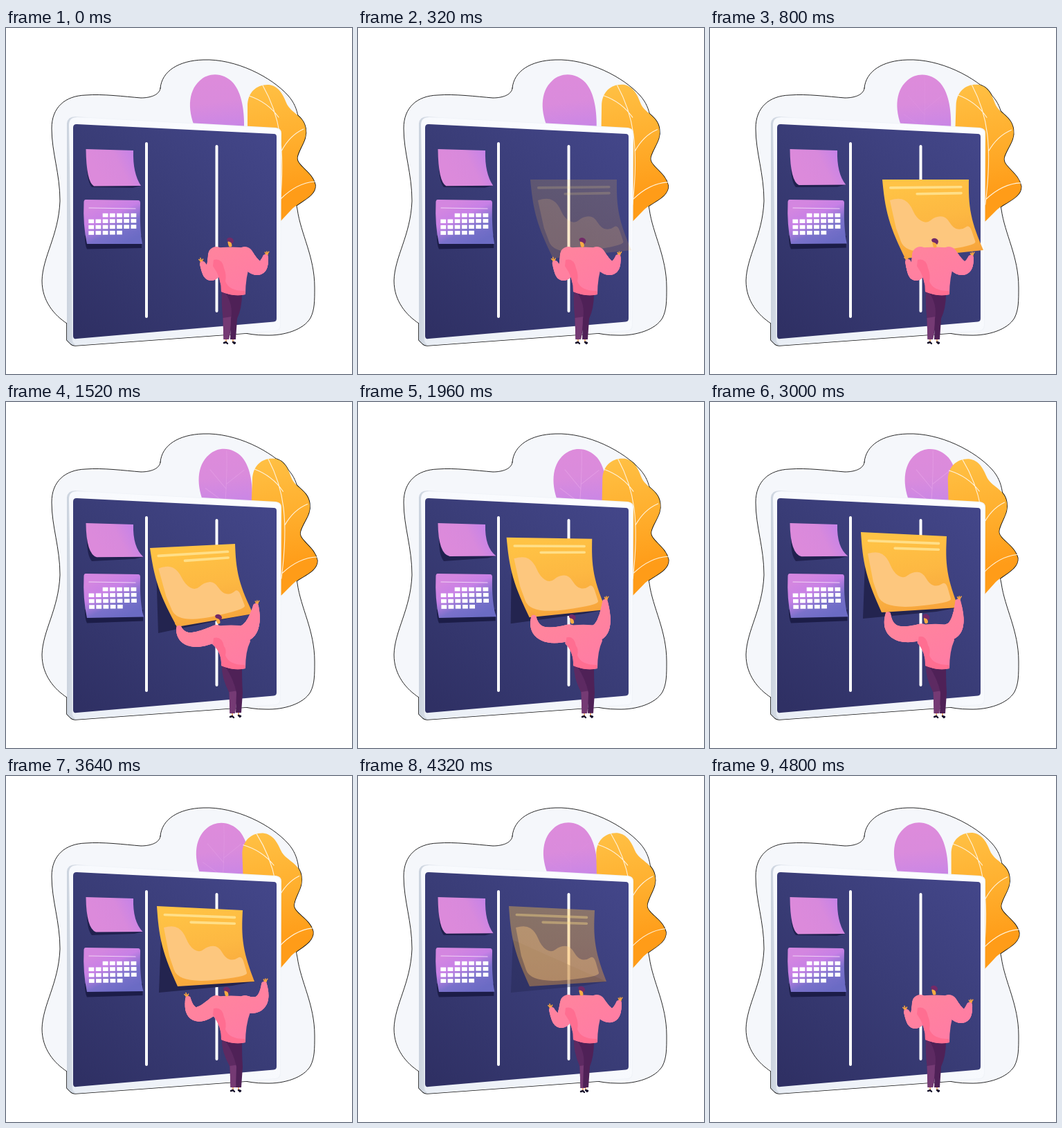
These frames come from a looping animation (500 px wide and 500 px high, 4.84 s). An HTML page with a canvas:

```html
<!DOCTYPE html>
<html lang="en">
<head>
<meta charset="utf-8">
<title>Planning board</title>
<style>
html, body { margin: 0; width: 100%; height: 100%; overflow: hidden; background: #fff; }
canvas { display: block; width: 500px; height: 500px; }
</style>
</head>
<body>
<canvas id="stage" width="500" height="500"></canvas>
<script>
const ctx = document.getElementById('stage').getContext('2d');
const LOOP = 4840;
const TAU = Math.PI * 2;

const clamp = x => Math.max(0, Math.min(1, x));
const mix = (a, b, k) => a + (b - a) * k;
const ramp = (t, from, to) => clamp((t - from) / (to - from));
const ease = x => (1 - Math.cos(Math.PI * x)) / 2;
const span = (n, fn) => Array.from({ length: n + 1 }, (_, i) => fn(i / n));

function gradient(x0, y0, x1, y1, ...colors) {
  const g = ctx.createLinearGradient(x0, y0, x1, y1);
  colors.forEach((c, i) => g.addColorStop(i / (colors.length - 1), c));
  return g;
}

function fill(path, color) {
  ctx.fillStyle = color;
  ctx.fill(path);
}

function stroke(path, color, width) {
  ctx.strokeStyle = color;
  ctx.lineWidth = width;
  ctx.lineCap = ctx.lineJoin = 'round';
  ctx.stroke(path);
}

function polygon(points) {
  const path = new Path2D();
  points.forEach(([x, y]) => path.lineTo(x, y));
  path.closePath();
  return path;
}

// Closed shape whose points act as control points of a soft curve.
function softShape(points) {
  const path = new Path2D();
  path.moveTo(...points[0]);
  for (let i = 1; i < points.length - 1; i++) {
    const [x, y] = points[i], [nx, ny] = points[i + 1];
    path.quadraticCurveTo(x, y, (x + nx) / 2, (y + ny) / 2);
  }
  path.lineTo(...points[points.length - 1]);
  path.closePath();
  return path;
}

function dot(x, y, r, color) {
  const path = new Path2D();
  path.arc(x, y, r, 0, TAU);
  fill(path, color);
}

// Tracks hold [time, values] pairs; values ease from one key to the next.
function sample(track, t) {
  let i = 0;
  while (i < track.length - 2 && t >= track[i + 1][0]) i++;
  const [t0, a] = track[i], [t1, b] = track[i + 1];
  const k = ease(ramp(t, t0, t1));
  return a.map((v, n) => mix(v, b[n], k));
}

const BLOB = `M223 87C225 62 250 47 285 46C332 44 384 71 408 98
  C424 116 426 140 420 165C412 200 415 235 421 262
  C426 298 446 330 446 375C446 395 446 407 440 419C430 436 402 445 375 444
  C360 444 350 442 335 439L88 427C70 415 52 395 52 365
  C53 330 76 300 78 250C78 210 66 180 66 145C66 115 85 98 115 97
  C140 95 170 99 195 101C208 101 222 97 223 87Z`;
const blob = new Path2D(BLOB);
const outsideBlob = new Path2D('M0 0H500V500H0Z' + BLOB);

const leaf = new Path2D(`M349 150L349 113C349 92 363 81 380 82
  C395 84 401 98 405 108C411 123 430 126 433 145C436 161 425 171 421 186
  C418 199 443 207 447 227C448 244 423 251 412 263L397 279L380 285Z`);
const leafVeins = new Path2D(`M371 83C395 125 404 170 396 255
  M351 98Q378 107 394 129M398 178Q410 155 430 146M397 247Q420 224 446 222`);
const petal = new Path2D(`M276 150C262 122 262 92 280 76C294 63 315 65 328 79
  C341 94 345 120 344 150Z`);
const petalVeins = new Path2D('M305 150Q307 100 305 70M306 125L282 98M306 118L331 97M305 145L276 125');
const board = new Path2D(`M100 128L390 144Q398 145 398 152L397 430Q397 437 390 438
  L100 459Q96 459 93 456L88 451V138Q89 128 100 128Z`);
const frame = new Path2D(`M103 129L390 145Q397 146 397 153L396 429Q396 436 389 437
  L104 458Q97 458 96 451L91 140Q91 129 103 129Z`);
const panel = new Path2D(`M102 139L387 153Q391 153 391 157V420Q391 424 387 424.5
  L102 449Q97 450 97 445V144Q97 139 102 139Z`);
const dividers = new Path2D('M203 167V417M304.5 171V409');

function outlineOutside(path) {
  ctx.save();
  ctx.clip(outsideBlob, 'evenodd');
  stroke(path, '#111', 1.6);
  ctx.restore();
}

function drawBackdrop(t, sway) {
  fill(blob, '#f5f7fb');
  stroke(blob, '#111', 0.9);

  ctx.save();
  ctx.translate(310 + 17 * sway, 140 + sway);
  ctx.rotate(0.04 * sway);
  ctx.translate(-310, -140);
  fill(petal, gradient(300, 68, 310, 146, '#dd8bdb', '#da8bdc', '#c986e6'));
  ctx.globalAlpha = 0.6 * sway;
  stroke(petalVeins, '#e9a9ea', 1);
  ctx.restore();

  const leafPose = new DOMMatrix()
    .translate(390, 310)
    .rotate(2.2 * Math.sin(TAU * t / LOOP))
    .translate(-390, -310);
  const swayingLeaf = new Path2D();
  swayingLeaf.addPath(leaf, leafPose);
  const swayingVeins = new Path2D();
  swayingVeins.addPath(leafVeins, leafPose);
  outlineOutside(swayingLeaf);
  fill(swayingLeaf, gradient(370, 82, 400, 240, '#ffc044', '#ffb02f', '#ff9c18'));
  stroke(swayingVeins, '#fff3dc', 1.1);
}

function drawBoard() {
  outlineOutside(board);
  fill(board, gradient(88, 0, 120, 0, '#cbd3de', '#f0f3f8'));
  fill(frame, gradient(90, 440, 390, 150, '#e9eef5', '#f7f9fd', '#fcfdff'));
  fill(panel, gradient(110, 440, 385, 160, '#2f3064', '#393c76', '#434689'));
  stroke(dividers, '#fff', 4);
}

function drawBlankNote(sway) {
  const x = 195 + 5 * sway, y = 228 - 6 * sway;
  const left = 127 + 6 * sway;
  fill(new Path2D(`M117 198Q117 222 124 230L${x - 12} ${y + 3}L${x} ${y}L150 195Z`), '#20214f');
  fill(new Path2D(`M115.5 175L184 177Q183 210 ${x} ${y}L${left} ${y + 0.5}
    Q116 ${222 - 3 * sway} 115.5 175Z`),
    gradient(135, 215, 195, 185, '#dc8adb', '#d889dc', '#c181eb'));
}

function drawCalendar(sway) {
  const x = 197 + 3 * sway, y = 312 - 2 * sway;
  fill(new Path2D(`M114 300Q114 314 117 319.5L${x - 1} ${y + 6}V300Z`), '#1c1d48');
  fill(new Path2D(`M115 248L191 249Q194 249 194 253Q193 290 ${x} ${y}
    L117 312Q111 285 112.5 251Q113 248 115 248Z`),
    gradient(140, 252, 169, 312, '#d486e0', '#c780e6', '#7a71cb', '#6b6bc4'));
  stroke(new Path2D('M120 260L187 261'), '#f0d2f5', 1.2);
  ctx.fillStyle = '#fff';
  const rows = [[2, 6], [0, 6], [0, 6], [0, 4]];
  rows.forEach(([first, last], row) => {
    for (let col = first; col <= last; col++) {
      const top = 267.8 + row * 8.4 + (row ? 0.3 - 0.1 * col : 0);
      ctx.fillRect(119.3 + col * 10.2 + sway * row * 0.4, top, 7.8, 5.6);
    }
  });
}

// Corners run top left, top right, bottom right, bottom left.
const noteTrack = [
  [900, [249, 219, 374, 219, 395, 321, 282, 333]],
  [1520, [208, 211, 331, 205, 357, 306, 247, 325]],
  [2250, [218, 188, 342, 194, 359, 297, 248, 304]]
];

// Light hill on the note, in fractions of its width and height.
const hill = [
  [0.06, 0.265], [0.18, 0.23], [0.29, 0.31], [0.33, 0.5], [0.43, 0.59], [0.56, 0.5],
  [0.69, 0.5], [0.74, 0.67], [0.84, 0.7], [0.95, 0.63], [0.95, 0.82], [0.94, 0.93],
  [0.03, 0.965], [0.05, 0.62]
];

function drawBigNote(t) {
  const alpha = ramp(t, 250, 650) * (1 - ramp(t, 4040, 4500));
  if (!alpha) return;
  const [ax, ay, bx, by, cx, cy, dx, dy] = sample(noteTrack, t);
  const at = (u, v) => [
    mix(mix(ax, bx, u), mix(dx, cx, u), v) - 7 * Math.sin(Math.PI * v),
    mix(mix(ay, by, u), mix(dy, cy, u), v)
  ];
  const line = (u0, u1, v) => polygon([at(u0, v), at(u1, v)]);

  ctx.save();
  ctx.globalAlpha = alpha * ramp(t, 950, 1450);
  const [sx, sy] = at(0, 0.42);
  fill(new Path2D(`M${sx} ${sy}L${dx - 27} ${dy + 9}L${cx - 32} ${cy + 6}L${cx} ${cy}Z`), '#23244f');

  ctx.globalAlpha = alpha;
  const sheet = polygon([...span(16, v => at(0, v)), ...span(16, v => at(1, 1 - v))]);
  fill(sheet, gradient(ax + 60, ay, ax + 85, dy, '#ffc345', '#fdb842', '#f7a53c'));
  fill(softShape(hill.map(([u, v]) => at(u, v))), '#fdc77e');
  stroke(line(0.085, 0.91, 0.105), '#ffdf88', 3.6);
  stroke(line(0.39, 0.91, 0.19), '#ffdf88', 3.6);
  ctx.restore();
}

// Left shoulder, elbow, wrist; right elbow, wrist; head; left foot, right foot.
const poses = {
  open: [304, 328, 297, 355, 284, 341, 364, 347, 375, 331, 324, 307, 318, 454, 328, 454],
  grip: [304, 328, 298, 355, 286, 338, 365, 347, 377, 332, 325, 308, 318, 454, 328, 454],
  carry: [304, 334, 267, 343, 250, 327, 356, 321, 361, 295, 307, 311, 327, 454, 336, 453],
  place: [306, 333, 267, 330, 256, 304, 354, 318, 355, 286, 311, 311, 327, 454, 336, 454],
  release: [304, 329, 275, 344, 263, 322, 367, 327, 373, 301, 319, 309, 328, 454, 336, 454],
  relax: [304, 328, 294, 354, 280, 338, 365, 346, 377, 328, 323, 308, 325, 455, 329, 454]
};
const manTrack = [
  [0, poses.open], [800, poses.grip], [1520, poses.carry], [2250, poses.place],
  [2750, poses.place], [3640, poses.release], [4320, poses.relax], [LOOP, poses.open]
];

function drawHand(x, y, side) {
  ctx.save();
  ctx.translate(x, y);
  ctx.rotate(side * 0.45);
  stroke(new Path2D('M0 1V-5'), '#f7a440', 3.6);
  stroke(new Path2D(`M0 -4L1 -9M0 -4L-1.8 -8M0 -3L${-side * 3.5} -6`), '#f7a440', 1.6);
  ctx.restore();
}

function drawArm(sx, sy, ex, ey, wx, wy, color) {
  const px = 2 * ex - (sx + wx) / 2, py = 2 * ey - (sy + wy) / 2;
  span(48, k => {
    const x = mix(mix(sx, px, k), mix(px, wx, k), k);
    const y = mix(mix(sy, py, k), mix(py, wy, k), k);
    dot(x, y, mix(12, 4, k * k), color);
  });
}

function drawLegs(lx, ly, rx, ry) {
  for (const [x, y, dir] of [[lx, ly, -1], [rx, ry, 1]]) {
    stroke(new Path2D(`M${x} ${y - 5}V${y}`), '#f4b27c', 2);
    stroke(new Path2D(`M${x} ${y}L${x + dir * 3} ${y + 1}M${x} ${y}L${x + 2} ${y + 2}`), '#17122b', 2.4);
  }
  const knee = lx - 4.5;
  fill(new Path2D(`M312 380Q311 398 ${knee} 420L${lx - 3.5} ${ly - 4}H${lx + 4}L336 385Z`), '#5d2a62');
  fill(new Path2D(`M${knee} 419L${knee + 13} 417L${lx + 4} ${ly - 4}H${lx - 3.5}Z`), '#753a74');
  fill(new Path2D(`M316 381L341 384Q341 405 ${rx + 6} 420L${rx + 4} ${ry - 4}H${rx - 4}
    L${rx - 3} 420Q329 400 316 381Z`), '#4f2157');
}

function drawMan(t) {
  const [sx, sy, ex, ey, wx, wy, rex, rey, rwx, rwy, hx, hy, lx, ly, rx, ry] = sample(manTrack, t);
  drawLegs(lx, ly, rx, ry);
  drawHand(wx, wy, -1);
  drawHand(rwx, rwy, 1);

  const top = sy - 11;
  const pink = gradient(300, 315, 335, 385, '#ff849d', '#ff7ca4');
  drawArm(sx, sy, ex, ey, wx, wy, pink);
  drawArm(345, sy, rex, rey, rwx, rwy, pink);
  fill(new Path2D(`M${sx - 4} ${top + 1}Q326 ${top - 2} 349 ${top + 1}L353 ${sy + 12}
    Q346 360 346 385Q330 389 311 381Q312 362 ${sx - 6} ${sy + 16}Z`), pink);
  fill(new Path2D(`M${sx - 4} ${sy + 7}Q312 ${sy + 4} 315 ${sy + 19}Q319 357 317 366
    Q322 380 345 380L346 385Q330 389 311 381Q312 362 ${sx - 5} ${sy + 16}Z`), '#ff6e91');

  stroke(new Path2D(`M${hx - 1} ${hy + 3}L${hx} ${hy + 7}`), '#f8ab43', 5);
  fill(new Path2D(`M${hx - 5} ${hy - 2}Q${hx - 2} ${hy - 6} ${hx + 3} ${hy - 3}
    Q${hx + 7} ${hy} ${hx + 3} ${hy + 5}Q${hx + 1} ${hy + 2} ${hx - 4} ${hy + 1}Z`), '#722a68');
}

function draw(t) {
  const sway = (1 - Math.cos(TAU * t / LOOP)) / 2;
  ctx.clearRect(0, 0, 500, 500);
  drawBackdrop(t, sway);
  drawBoard();
  drawBlankNote(sway);
  drawCalendar(sway);
  drawBigNote(t);
  drawMan(t);
}

const start = performance.now();
function tick() {
  draw((performance.now() - start) % LOOP);
  requestAnimationFrame(tick);
}
tick();
</script>
</body>
</html>
```
